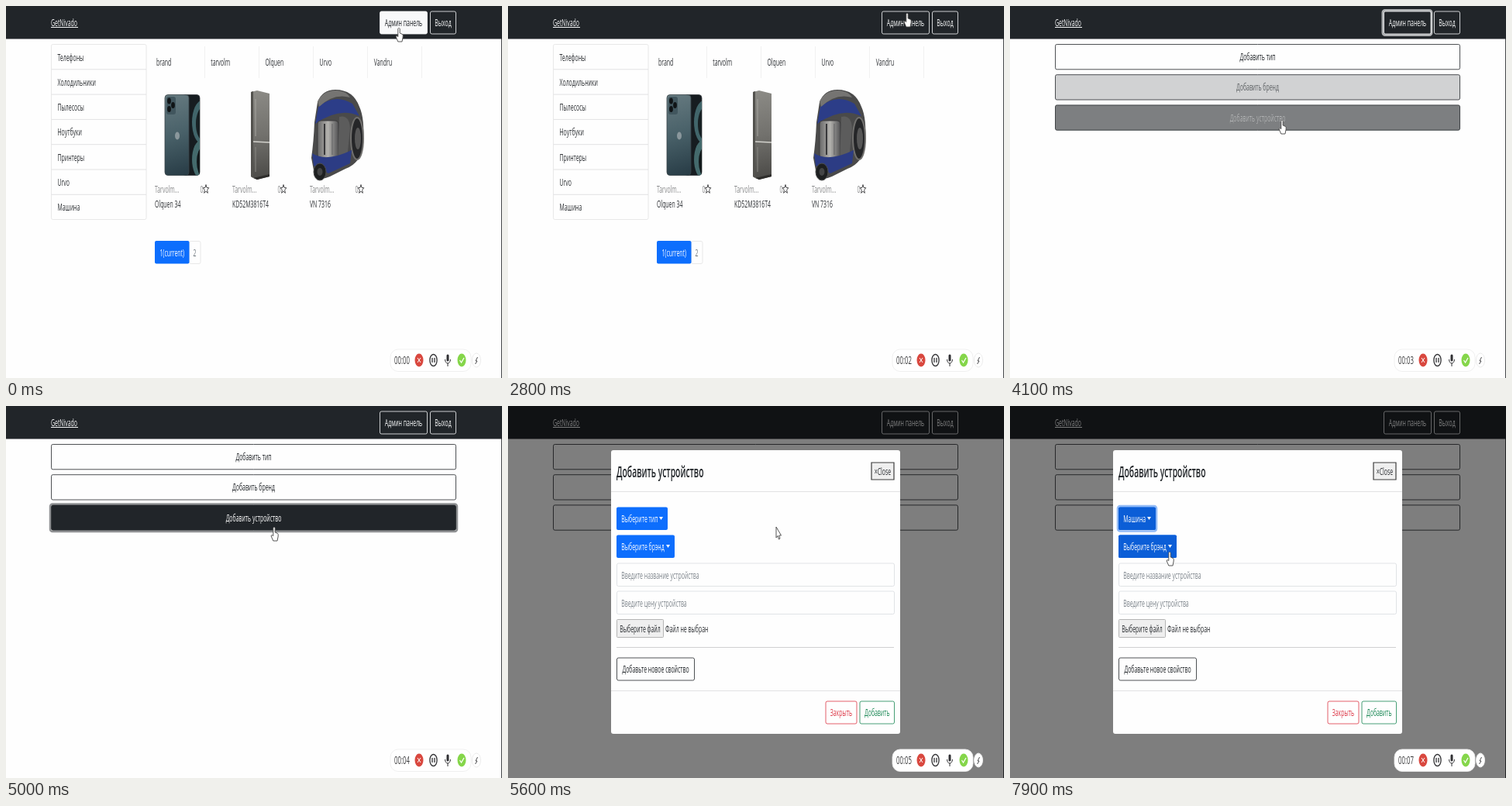
An HTML page with a canvas that plays this animation: 640 px wide and 480 px high, repeating every 8000 ms.

```html
<!DOCTYPE html>
<html lang="ru">
<head>
<meta charset="utf-8">
<title>Shop admin</title>
<style>
html, body { margin: 0; height: 100%; overflow: hidden; background: #fefefe; }
canvas { display: block; width: 100vw; height: 100vh; }
</style>
</head>
<body>
<canvas id="stage" width="640" height="480"></canvas>
<script>
const c = document.getElementById('stage').getContext('2d');
const LOOP = 8000;
const PAPER = '#fefefe', DARK = '#212529', INK = '#2c2f33', LIGHT = '#f8f9fa', RULE = '#e2e2e3';
const BLUE = '#0d6efd', BLUE_HOVER = '#0b5ed7';
const TYPES = ['Телефоны', 'Холодильники', 'Пылесосы', 'Ноутбуки', 'Принтеры', 'Urvo', 'Машина'];
const BRANDS = ['brand', 'tarvolm', 'Olquen', 'Urvo', 'Vandru'];
const GOODS = ['Olquen 34', 'KD52M3816T4', 'VN 7316'];

// Times in ms
const TICKS = [1200, 2300, 3300, 4300, 5500, 6700, 7700];
const PAGE = 3100, PRESS = 4500, OPEN = 5088, MENU = 6300, CHOICE = 7200;
const CURSOR = [
  [1400, 507, 28], [1500, 499, 31], [2100, 499, 31], [2300, 458, 22], [2500, 512, 0], [2700, 512, 0],
  [2800, 515, 9], [3500, 515, 9], [4100, 351, 147], [4300, 346, 156], [5700, 346, 156],
  [6200, 195, 145], [6400, 195, 145], [6500, 192, 165], [6600, 180, 274], [6900, 165, 328],
  [7200, 165, 328], [7700, 203, 200], [7900, 206, 188]
];

// Linear interpolation through the cursor points; i picks x or y
function track(t, pts, i) {
  if (t <= pts[0][0]) return pts[0][i];
  for (let k = 1; k < pts.length; k++) {
    const a = pts[k - 1], b = pts[k];
    if (t <= b[0]) return a[i] + (b[i] - a[i]) * (t - a[0]) / (b[0] - a[0]);
  }
  return pts[pts.length - 1][i];
}

// Transition progress 0..1 from a start time
const ramp = (t, from, span = 150) => Math.max(0, Math.min(1, (t - from) / span));
const hover = (t, on, off) => Math.max(0, ramp(t, on) - ramp(t, off));

function faded(alpha, draw) {
  c.save();
  c.globalAlpha *= alpha;
  draw();
  c.restore();
}

function text(s, x, y, color = INK, size = 16, weight = 400, align = 'left') {
  c.save();
  c.translate(x, y);
  c.scale(.432, .79);
  c.font = `${weight} ${size}px "Open Sans", "Noto Sans", sans-serif`;
  c.textAlign = align;
  c.fillStyle = color;
  c.fillText(s, 0, 0);
  c.restore();
}

function paint(path, fill, line, lw) {
  if (fill) { c.fillStyle = fill; c.fill(path); }
  if (line) { c.strokeStyle = line; c.lineWidth = lw; c.stroke(path); }
}

function box(x, y, w, h, fill, line, r = 2, lw = .8) {
  const p = new Path2D();
  p.roundRect(x, y, w, h, r);
  paint(p, fill, line, lw);
  return p;
}

function oval(x, y, rx, ry, fill, line, lw = 1) {
  const p = new Path2D();
  p.ellipse(x, y, rx, ry, 0, 0, 7);
  paint(p, fill, line, lw);
}

function shape(d, fill, line, lw = 1) {
  paint(new Path2D(d), fill, line, lw);
}

function rule(x1, y1, x2, y2, color = RULE, lw = 1) {
  shape(`M${x1} ${y1}L${x2} ${y2}`, null, color, lw);
}

function shade(x1, y1, x2, y2, ...colors) {
  const g = c.createLinearGradient(x1, y1, x2, y2);
  colors.forEach((col, i) => g.addColorStop(i / (colors.length - 1), col));
  return g;
}

// Outline button; k is how far the hover fill has faded in
function button(x, y, w, h, label, color, k = 0, hoverInk = '#fff') {
  const mid = x + w / 2, base = y + h / 2 + 4.5;
  faded(k, () => box(x, y, w, h, color));
  box(x, y, w, h, null, color);
  faded(1 - k, () => text(label, mid, base, color, 16, 400, 'center'));
  faded(k, () => text(label, mid, base, hoverInk, 16, 400, 'center'));
}

function picker(y, w, label, k, focus) {
  if (focus) box(139, y - 1.5, w + 2, 32.5, null, '#92bbf6', 3, 2.5);
  box(140, y, w, 29.5, BLUE);
  faded(k, () => box(140, y, w, 29.5, BLUE_HOVER));
  text(label, 146.3, y + 19, '#fff');
  shape(`M${129 + w} ${y + 12.5}h5l-2.5 4z`, '#fff');
}

function phone() {
  const screen = box(228, 114.5, 22, 104, '#161c20', '#383d40', 4);
  c.save();
  c.clip(screen);
  oval(253, 150, 13, 28, '#41656a');
  oval(254, 152, 9, 21, '#172023');
  oval(252, 198, 12, 25, '#446a6c');
  oval(254, 201, 8, 19, '#12191b');
  c.restore();
  box(205, 114.5, 31, 104, shade(205, 115, 236, 218, '#667a80', '#486068', '#273b45'), '#3a464a', 4);
  box(207, 117, 12, 23, '#41565e', null, 3);
  oval(210.5, 122.5, 2.4, 4, '#101416');
  oval(210.5, 133, 2.4, 4, '#101416');
  oval(215.5, 128, 2.4, 4, '#101416');
  oval(221, 167.5, 3, 5, '#8a979c');
}

function fridge() {
  shape('M316 111L324 109L340 113V220L324 224L316 220Z', shade(316, 110, 340, 224, '#8c8b86', '#72716d', '#494845'));
  shape('M316 111L319 110V222L316 220Z', '#53524e');
  rule(319, 175, 340, 176, '#d2d1cc', 1.5);
  rule(322, 120, 322, 168, '#a5a49f');
  rule(322, 182, 322, 214, '#898883');
  shape('M319 222L340 217V220L324 224Z', '#2e2d2b');
}

function vacuum() {
  shape('M402 124Q408 108 425 108Q448 108 456 130Q463 145 461 178Q458 203 438 210L418 220Q400 228 397 212L394 196Q397 175 398 150Z', '#4a4a4a');
  shape('M403 130Q424 112 447 126L456 142Q430 130 399 152Z', '#2c3d88');
  shape('M402 123Q410 108 427 109Q440 110 444 118Q423 112 404 130Z', '#757472');
  oval(453, 171, 8, 27, '#252628', '#706f6d', 2);
  oval(454, 171, 4, 14, '#565656');
  box(402, 148, 27, 48, shade(402, 0, 429, 0, '#686868', '#b3b2ae', '#525254'), '#363638', 4);
  rule(411, 152, 411, 192, '#38383a', 2);
  rule(421, 152, 421, 192, '#767676', 2);
  shape('M430 143Q443 140 444 158L440 198L428 203Z', '#5c5c5c');
  shape('M395 190Q413 202 446 186L444 203L416 216L397 206Z', '#2c3c84');
  oval(405, 214, 8, 11, '#1d1f20', '#4c4d4d');
  oval(405, 214, 3.5, 5, '#444546');
}

function star(x, y) {
  let d = '';
  for (let i = 0; i < 10; i++) {
    const r = i % 2 ? .45 : 1, a = i * Math.PI / 5;
    d += (i ? 'L' : 'M') + (x + Math.sin(a) * r * 4) + ' ' + (y - Math.cos(a) * r * 6);
  }
  shape(d + 'Z', null, '#4a4a4c');
}

function navbar(t) {
  c.fillStyle = DARK;
  c.fillRect(0, 0, 640, 42.5);
  text('GetNivado', 58, 26, LIGHT);
  rule(58, 27.5, 93, 27.5, LIGHT);
  const k = t < 2800 ? 1 - ramp(t, 2200) : hover(t, 2800, 3550);
  if (t >= 3000 && t < PRESS) box(481, 5.5, 63, 32, null, '#aeb0b2', 3, 3);
  button(482.5, 7, 61, 29, 'Админ панель', LIGHT, k, DARK);
  button(547.5, 7, 33, 29, 'Выход', LIGHT);
}

function shopPage() {
  box(58.5, 49.5, 122.5, 226, null, RULE);
  TYPES.forEach((s, i) => {
    if (i) rule(58.5, 49.5 + i * 32.3, 181, 49.5 + i * 32.3);
    text(s, 66.5, 70.5 + i * 32.3);
  });
  BRANDS.forEach((s, i) => {
    rule(256.5 + i * 70, 52, 256.5 + i * 70, 93, '#f1f1f1');
    text(s, 194 + i * 70.2, 76.5);
  });
  phone();
  fridge();
  vacuum();
  GOODS.forEach((s, i) => {
    const x = 192 + i * 100;
    text('Tarvolm...', x, 240.5, '#88898a');
    text('0', x + 58.5, 240.5, '#88898a');
    star(x + 66, 236.5);
    text(s, x, 259.5);
  });
  box(236.5, 303.5, 14.5, 29, null, RULE);
  box(192, 303, 44.5, 29.5, BLUE);
  text('1(current)', 214.2, 322.5, '#fff', 16, 400, 'center');
  text('2', 243.5, 322.5, '#6c757d', 16, 400, 'center');
}

function adminPage(t) {
  const spans = [[3690, 3820], [3830, 3980], [4013, OPEN]];
  if (t >= PRESS && t < OPEN) box(57, 126.5, 525, 35.5, null, '#909294', 3, 2.5);
  ['тип', 'бренд', 'устройство'].forEach((s, i) =>
    button(58.5, 49.5 + i * 39.2, 522, 32.3, 'Добавить ' + s, DARK, hover(t, ...spans[i])));
}

function field(y, hint) {
  box(140.5, y, 358, 29.5, null, '#d9dce0');
  text(hint, 146.3, y + 19.5, '#7d848b');
}

function menu(cy) {
  box(140.5, 160.5, 74, 190, PAPER, '#d8d8d8');
  const row = Math.floor((cy - 167) / 25.2);
  if (row >= 0) {
    c.fillStyle = '#e9ecef';
    c.fillRect(141, 168 + row * 25.2, 73, 25.2);
  }
  TYPES.forEach((s, i) => text(s, 148.5, 185 + i * 25.2));
}

function modal(t, cy) {
  const chosen = t >= CHOICE, rest = (1 - ramp(t, OPEN, 300)) ** 1.75;
  c.save();
  c.translate(0, -39.5 * rest);
  c.globalAlpha = ramp(t, OPEN);
  box(133, 57, 373, 366, PAPER, null, 3);
  text('Добавить устройство', 140, 91.5, DARK, 24, 600);
  box(469, 73, 29, 22, '#efefef', '#3c3c3c', 0, 1.2);
  text('×Close', 483.5, 88.5, INK, 16, 400, 'center');
  rule(133, 110.5, 506, 110.5);
  picker(130.5, chosen ? 48 : 66, chosen ? 'Машина' : 'Выберите тип', ramp(t, 6150), t >= MENU);
  picker(166.5, 75, 'Выберите брэнд', ramp(t, 7700));
  field(203, 'Введите название устройства');
  field(239, 'Введите цену устройства');
  box(140.5, 275.5, 60, 23, '#efefef', '#a4a4a4', 1);
  text('Выберите файл', 170.5, 291.5, INK, 16, 400, 'center');
  text('Файл не выбран', 203, 291.5);
  rule(140, 311.5, 498, 311.5, '#d0d0d1');
  button(140.5, 325, 100, 29, 'Добавьте новое свойство', DARK);
  rule(133, 367.5, 506, 367.5);
  button(410, 381, 40, 29, 'Закрыть', '#dc3545');
  button(454, 381, 44.5, 29, 'Добавить', '#198754');
  if (t >= MENU && !chosen) menu(cy);
  c.restore();
}

function cursor(t, x, y) {
  const arrow = (t >= 2300 && t < 2800) || (t >= 3500 && y > 38 && y < 48) || (t >= 5300 && x > 208);
  c.save();
  c.translate(x, y);
  shape(arrow
    ? 'M0 0V14L2 11.5L3.5 16L5 15L3.8 11H6.5Z'
    : 'M-1.2 1.5Q0 -1 1.2 1.5V7L4.6 8.5Q5.5 9 5.2 12L4 18H-1.2L-3.8 12Q-4 9.5-1.2 11.5Z',
    '#fff', '#444', .9);
  c.restore();
}

function recorder(t) {
  box(496, 443, 104, 28.5, '#fff', '#ececec', 10);
  oval(607, 457, 5.5, 9, '#fff', '#ececec');
  text('00:0' + TICKS.filter(k => t >= k).length, 501, 461.5, '#3c3c3e', 18);
  oval(533, 457, 5.5, 8.5, '#d9483f');
  shape('M531 454L535 460M535 454L531 460', null, '#fff');
  oval(551.5, 457, 4.6, 7.5, null, '#303033', 1.3);
  shape('M550 454V460M553 454V460', null, '#303033', 1.3);
  box(568.5, 449.5, 3, 9, '#303033', null, 1.5);
  shape('M566.5 456Q567 461 570 461Q573 461 573.5 456M570 461V465', null, '#303033');
  oval(588, 457, 5.5, 8.5, '#85d64a');
  shape('M585.5 457L587.5 460L591 454', null, '#fff', 1.2);
  shape('M608.5 453L606 458H608L605.5 462', null, '#4c4c4e');
}

function draw(t) {
  const x = track(t, CURSOR, 1), y = track(t, CURSOR, 2);
  c.fillStyle = PAPER;
  c.fillRect(0, 0, 640, 480);
  c.fillStyle = '#45474a';
  c.fillRect(639, 42, 1, 438);
  navbar(t);
  if (t < PAGE) shopPage();
  else adminPage(t);
  faded(ramp(t, OPEN) / 2, () => {
    c.fillStyle = '#000';
    c.fillRect(0, 0, 640, 480);
  });
  if (t > OPEN) modal(t, y);
  cursor(t, x, y);
  recorder(t);
}

const start = performance.now();
function frame() {
  const t = (performance.now() - start) % LOOP;
  draw(Math.floor(t / 100) * 100);
  requestAnimationFrame(frame);
}
frame();
</script>
</body>
</html>
```
